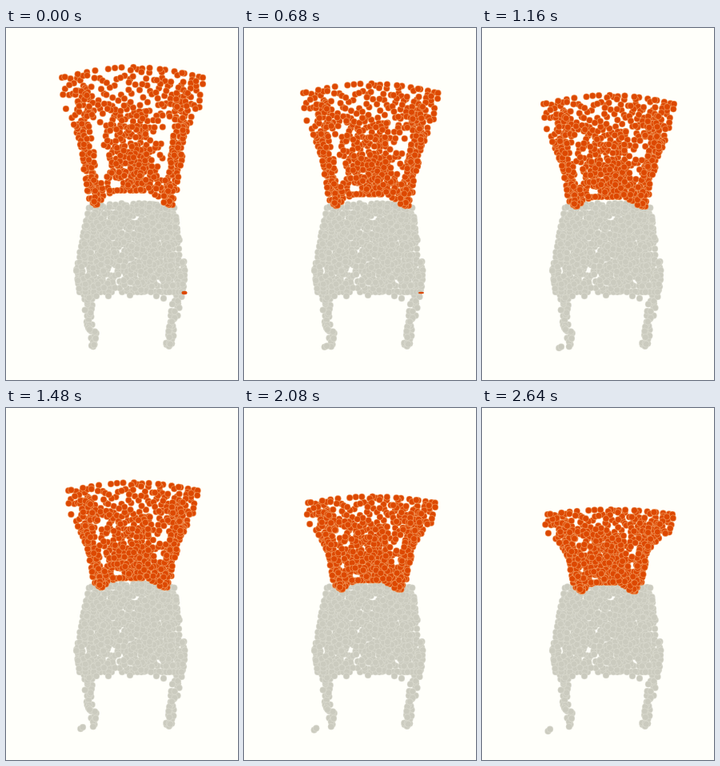
Recreate the animation shown at these times as an HTML page with a canvas. Size 290 by 440 pixels, loop 2680 ms.

```html
<!DOCTYPE html>
<html lang="en">
<head>
<meta charset="utf-8">
<title>Chair point cloud</title>
<style>
  html, body { margin: 0; width: 100%; height: 100%; overflow: hidden; background: #fffffa; }
  canvas { display: block; }
</style>
</head>
<body>
<canvas id="stage" width="290" height="440"></canvas>
<script>
const ctx = document.getElementById('stage').getContext('2d');
const LOOP = 2680, STEP = 40, MIDDLE = 1160 / 2640;
const ORANGE = ['#dd4800', 'rgba(255,225,180,.55)'];
const GREY = ['#cbcbbf', 'rgba(232,232,222,.55)'];

let seed = 11;
const random = () => (seed = (seed * 16807) % 2147483647) / 2147483647;
const mix = (a, b, k) => a + (b - a) * k;
const clamp = x => Math.min(1, Math.max(0, x));
const bulge = u => Math.sin(Math.PI * u);
// Arch with flat feet and steep shoulders
const archway = u => clamp((bulge(u) - .32) * 2) ** .8;

// Value at v (0..1) along evenly spaced samples
function along(list, v) {
  const x = clamp(v) * (list.length - 1);
  const i = Math.min(list.length - 2, Math.floor(x));
  return mix(list[i], list[i + 1], x - i);
}

// Loosely spread random points: of a few candidates keep the farthest from the others
function scatter(count, place, width, height) {
  const points = [];
  while (points.length < count) {
    let best, bestGap = -1;
    for (let k = 0; k < 3; k++) {
      const p = place(random(), random());
      let gap = 1e9;
      for (const q of points) {
        gap = Math.min(gap, ((p.u - q.u) * width) ** 2 + ((p.v - q.v) * height) ** 2);
      }
      if (gap > bestGap) { best = p; bestGap = gap; }
    }
    points.push(best);
  }
  return points;
}

// Outline of the backrest: tall, half way, short
const poses = [
  { left: [70, 71, 75, 85, 92, 95, 98, 101, 103],
    right: [246, 246, 241, 228, 224, 221, 217, 214, 210],
    top: 62, rise: 13, bottom: 221, arch: 18 },
  { left: [77, 78, 81, 88, 95, 100, 104, 106, 109],
    right: [240, 238, 233, 228, 223, 217, 211, 209, 206],
    top: 95, rise: 11, bottom: 223, arch: 12 },
  { left: [82, 79, 83, 97, 105, 109, 111, 113, 118],
    right: [238, 240, 233, 214, 208, 205, 203, 200, 193],
    top: 133, rise: 6, bottom: 229, arch: 11 }
];

function poseAt(s) {
  const late = s > MIDDLE;
  const a = poses[late ? 1 : 0], b = poses[late ? 2 : 1];
  const k = late ? (s - MIDDLE) / (1 - MIDDLE) : s / MIDDLE;
  const pose = {};
  for (const key in a) {
    pose[key] = Array.isArray(a[key])
      ? a[key].map((x, i) => mix(x, b[key][i], k))
      : mix(a[key], b[key], k);
  }
  return pose;
}

const post = side => (a, b) => {
  const v = mix(.12, 1, b);
  const u = v < .36 ? mix(.07, .18, a) : mix(0, .12, a);
  return { u: side ? 1 - u : u, v };
};
const back = [
  ...scatter(150, (a, b) => ({ u: clamp(mix(-.03, 1.03, a)), v: Math.max(0, mix(-.05, .36, b)) }), 160, 150),
  ...scatter(165, (a, b) => ({ u: mix(.19, .81, mix(a, random(), .25)), v: mix(.34, .88, b ** .85), slat: true }), 140, 150),
  ...scatter(95, (a, b) => ({ u: mix(.04, .96, a), v: Math.min(1, mix(.84, 1.04, b)) }), 110, 150),
  ...scatter(100, post(0), 130, 150),
  ...scatter(100, post(1), 130, 150)
].sort(() => random() - .5);

const seatLeft = [104, 98, 93, 88, 92], seatRight = [211, 214, 219, 225, 221];
const seat = scatter(680, (a, b) => ({ u: clamp(mix(-.02, 1.02, a)), v: clamp(mix(-.02, 1.02, b)) }), 125, 106)
  .map(({ u, v }) => [
    mix(along(seatLeft, v), along(seatRight, v), u),
    224 + 106 * v - 5 * bulge(u) * (1 - v)
  ]);

const leg = centers => scatter(36, (u, v) => ({ u, v }), 11, 66)
  .map(({ u, v }) => [along(centers, v) + (u - .5) * mix(12, 7, v), 333 + 66 * v]);
const base = [
  ...leg([102, 103, 104, 109, 111]),
  ...leg([214, 212, 209, 206, 203]),
  ...seat,
  [113, 335], [128, 335], [155, 334], [188, 335], [197, 338]
];

function dot(x, y, [fill, edge]) {
  ctx.beginPath();
  ctx.arc(x, y, 4, 0, 7);
  ctx.fillStyle = fill;
  ctx.fill();
  ctx.strokeStyle = edge;
  ctx.lineWidth = .7;
  ctx.stroke();
}

function draw(s) {
  ctx.fillStyle = '#fffffa';
  ctx.fillRect(0, 0, 290, 440);

  for (const [x, y] of base) dot(x, y, GREY);
  // Stray pair drifting away from the left leg
  dot(mix(107, 82.5, s), mix(397, 404, s), GREY);
  dot(mix(110, 85, s), mix(396, 401.5, s), GREY);

  if (s < .4) {
    ctx.fillStyle = ORANGE[0];
    ctx.beginPath();
    ctx.ellipse(223 - 6 * s, 331, 3.5, mix(2.2, .6, s / .4), 0, 0, 7);
    ctx.fill();
  }

  const pose = poseAt(s);
  const spread = mix(1, 1.35, clamp(s / .7));
  for (const p of back) {
    const u = p.slat ? .5 + (p.u - .5) * spread : p.u;
    const x = mix(along(pose.left, p.v), along(pose.right, p.v), u);
    const top = pose.top - pose.rise * bulge(u);
    const bottom = pose.bottom - pose.arch * archway(u);
    dot(x, mix(top, bottom, p.v), ORANGE);
  }
}

function tick() {
  const time = Math.floor(performance.now() % LOOP / STEP) * STEP;
  draw(time / (LOOP - STEP));
  requestAnimationFrame(tick);
}
tick();
</script>
</body>
</html>
```
